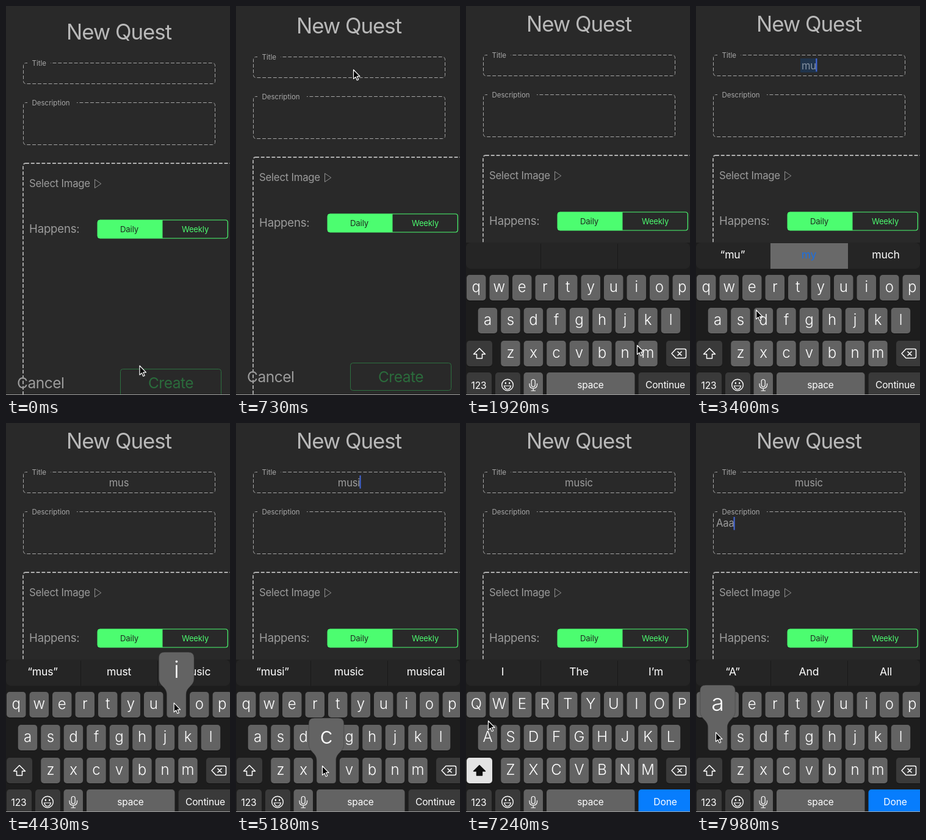
An HTML page that plays this animation: 367x638 px, repeating every 8000 ms.

```html
<!DOCTYPE html>
<html lang="en">
<head>
<meta charset="utf-8">
<title>New Quest</title>
<style>
  html, body { margin: 0; width: 100%; height: 100%; overflow: hidden; background: #292929; }
  svg { display: block; width: 367px; height: 638px; font-family: Inter, Roboto, sans-serif; }
  text { white-space: pre; letter-spacing: -.01em; }
</style>
</head>
<body>
<svg id="stage" viewBox="0 0 367 638"></svg>
<script>
const LOOP = 8000, STEP = 147.75;
const BG = '#292929', GREEN = '#4cfd70', KEY = '#636363', DARK = '#3a3a3a', GREY = '#9c9c9c';

// pointer tip: [step, x, y]
const PATH = [
  [0, 218.5, 589.5], [1, 217, 560], [3, 204, 300], [5, 192, 104], [6, 190, 84], [8, 190, 85],
  [9, 200, 354], [10, 226, 470], [11, 258, 535], [13, 280, 556], [15, 295, 561], [17, 295, 561],
  [20, 243, 458], [21, 241, 458], [23, 98, 498], [24, 74, 508], [26, 72, 509],
  [29, 272, 460], [32, 280, 456], [34, 158, 548], [35, 141, 562], [37, 141, 562],
  [39, 100, 290], [40, 85, 182], [41, 82, 165.5], [46, 82, 165.5], [49, 36, 488], [50, 32, 507], [54, 32, 507]
];
// typed text and suggestions: [step, text, suggestions]
const TYPED = [
  [0, '', []],
  [17, 'm', ['“m”', 'my', 'me']],
  [22, 'mu', ['“mu”', 'my', 'much']],
  [26, 'mus', ['“mus”', 'must', 'music']],
  [32, 'musi', ['“musi”', 'music', 'musical']],
  [36, 'music', ['“music”', 'musical', 'musicians']],
  [44, '', ['I', 'The', 'I’m']],
  [52, 'A', ['“A”', 'And', 'All']],
  [53, 'Aa', ['“A”', 'And', 'All']],
  [54, 'Aaa', ['“A”', 'And', 'All']]
];
const PRESSES = [[15, 16, 'm'], [20, 21, 'u'], [25, 25, 's'], [30, 31, 'i'], [35, 35, 'c'], [51, 54, 'a']];
const BLINKS = [[12, 14], [19, 19], [29, 30], [41, 42], [48, 50]];
const FOCUS_DESC = 44, CAPS_END = 52;

const stage = document.getElementById('stage');

function add(parent, tag, attrs = {}) {
  const el = document.createElementNS('http://www.w3.org/2000/svg', tag);
  set(el, attrs);
  parent.append(el);
  return el;
}
function set(el, attrs) {
  for (const name in attrs) el.setAttribute(name, attrs[name]);
}
function label(parent, str, x, y, size, fill, attrs = {}) {
  const el = add(parent, 'text', { x, y, fill, 'font-size': size, ...attrs });
  el.textContent = str;
  return el;
}
const MID = { 'text-anchor': 'middle' };
const rect = (parent, x, y, width, height, fill, rx = 0) =>
  add(parent, 'rect', { x, y, width, height, fill, rx });
const line = (parent, d, stroke, width, extra = {}) =>
  add(parent, 'path', { d, stroke, 'stroke-width': width, fill: 'none', ...extra });
const show = (el, on) => set(el, { visibility: on ? 'visible' : 'hidden' });

// ---- form ----
const form = add(stage, 'g');

function dashed(x, y, w, h, stroke, width) {
  set(rect(form, x, y, w, h, 'none', 4), { stroke, 'stroke-width': width, 'stroke-dasharray': '5.9 2.9' });
}
function field(name, gapEnd, y, h) {
  dashed(28.5, y, 314, h, '#a6a6a6', 1);
  rect(form, 35, y - 4, gapEnd - 35, 8, BG);
  label(form, name, 42.5, y + 4, 11.5, '#a8a8a8', { style: 'letter-spacing:0' });
}

label(form, 'New Quest', 185, 55, 34.8, '#b9b9b9', { ...MID, style: 'letter-spacing:-.03em' });
field('Title', 73, 93.5, 34);
field('Description', 116, 158.5, 69);
dashed(28, 258, 380, 400, '#b0b0b0', 1.8);
label(form, 'Select Image', 38, 297, 16.8, GREY, { style: 'letter-spacing:-.015em' });
line(form, 'M145.500 284.500V298.500L155.800 291.500Z', GREY, .9);
label(form, 'Happens:', 38, 372, 18.6, GREY);

line(form, 'M256 351H154Q150 351 150 355V377Q150 381 154 381H256Z', GREEN, 1, { fill: GREEN });
line(form, 'M256 351H359.300Q363.300 351 363.300 355V377Q363.300 381 359.300 381H256', GREEN, 1.2);
label(form, 'Daily', 202, 370.8, 13.2, '#1f2a21', MID);
label(form, 'Weekly', 310, 370.8, 13, GREEN, MID);

label(form, 'Cancel', 18, 627, 24.5, GREY, { style: 'letter-spacing:-.02em' });
set(rect(form, 187.5, 595.5, 165, 45, 'none', 4), { stroke: '#2d7040' });
label(form, 'Create', 270, 627, 24.5, '#2b6b3c', { ...MID, style: 'letter-spacing:-.02em' });

const mark = rect(form, 171, 99, 28, 23, '#20344c');
const titleText = label(form, '', 185, 117, 16.6, GREY, MID);
const descText = label(form, '', 33, 182.5, 16.6, GREY);
const caret = rect(form, 184, 99, 2, 21.5, '#4468dc');

// ---- keyboard ----
const board = add(stage, 'g');
rect(board, 0, 388, 367, 300, '#1d1d1d');
rect(board, 0, 388, 367, 43, '#252525', 8);
for (const x of [122, 248]) rect(board, x, 390, 1, 41, '#191919');
const pick = rect(board, 122, 389, 127, 42, '#696969');
const hints = [60, 185, 311].map(x => label(board, '', x, 414.3, 17.6, '#fff', MID));

function key(x, y, w, fill) {
  rect(board, x, y + 1, w, 42, '#111', 5);
  return rect(board, x, y, w, 42, fill, 5);
}
const keys = {};
[['qwertyuiop', 1, 441], ['asdfghjkl', 19.7, 495], ['zxcvbnm', 57.2, 549]].forEach(([row, left, y]) => {
  [...row].forEach((ch, i) => {
    const x = left + i * 37.5;
    key(x, y, 31.5, KEY);
    keys[ch] = { x, y, cap: label(board, ch, x + 15.7, y + 28, 24, '#fff', { ...MID, 'font-weight': 300 }) };
  });
});

const shiftKey = key(1, 549, 42, DARK);
const shiftIcon = line(board, 'M22 561.500L31.500 571H26.500V578H17.500V571H12.500Z', '#fff', 1.5, { 'stroke-linejoin': 'round' });
key(328, 549, 43, DARK);
line(board, 'M344 562.500H358Q360.500 562.500 360.500 565V575Q360.500 577.500 358 577.500H344L337 570Z' +
  'M346.500 566.500L353.500 573.500M353.500 566.500L346.500 573.500', '#fff', 1.5, { 'stroke-linejoin': 'round' });

key(1, 601, 41, DARK);
label(board, '123', 21, 627.5, 15.5, '#fff', MID);
key(48, 601, 41, DARK);
add(board, 'circle', { cx: 68, cy: 621.5, r: 9.3, fill: 'none', stroke: '#fff', 'stroke-width': 1.4 });
for (const cx of [64.8, 71.2]) add(board, 'ellipse', { cx, cy: 618.5, rx: 1.1, ry: 1.7, fill: '#fff' });
line(board, 'M62.500 623H73.500Q72 628.500 68 628.500T62.500 623Z', '#fff', 1.2);
key(94.5, 601, 31.5, KEY);
set(rect(board, 107.2, 612.5, 6, 12, 'none', 3), { stroke: '#fff', 'stroke-width': 1.2 });
line(board, 'M104 619V621Q104 627 110.200 627T116.500 621V619M110.200 627V631M106.500 631H114', '#fff', 1.2);
key(132, 601, 144.5, KEY);
label(board, 'space', 204, 627, 15.4, '#fff', MID);
const goKey = key(282.5, 601, 90, DARK);
const goText = label(board, '', 326.5, 627, 15.6, '#fff', MID);

// ---- key balloon ----
const balloon = add(stage, 'g');
const bubble = add(balloon, 'path', { fill: KEY, stroke: '#3c3c3c', 'stroke-width': .5 });
const bubbleText = label(balloon, '', 0, 0, 38, '#fff', { ...MID, 'font-weight': 300 });

function drawBalloon(ch, caps) {
  const { x, y } = keys[ch], l = x - 13, r = x + 44.5, t = y - 65, e = x + 31.5;
  set(bubble, { d: `M${l + 9} ${t}H${r - 9}Q${r} ${t} ${r} ${t + 9}V${y - 22}` +
    `C${r} ${y - 9} ${e} ${y - 9} ${e} ${y + 5}V${y + 37}Q${e} ${y + 42} ${e - 5} ${y + 42}` +
    `H${x + 5}Q${x} ${y + 42} ${x} ${y + 37}V${y + 5}C${x} ${y - 9} ${l} ${y - 9} ${l} ${y - 22}` +
    `V${t + 9}Q${l} ${t} ${l + 9} ${t}Z` });
  set(bubbleText, { x: x + 15.7, y: y - 23 });
  bubbleText.textContent = caps ? ch.toUpperCase() : ch;
}

// ---- pointer ----
rect(stage, 0, 637, 367, 1, '#a0a0a0');
const pointer = add(stage, 'path', {
  d: 'M.500 .500V15.500L4 12.400L6.300 17.800L8.700 16.800L6.400 11.400H11Z',
  fill: '#000', stroke: '#fff', 'stroke-width': 1.2, 'stroke-linejoin': 'round'
});

function pointerAt(k) {
  const i = Math.max(1, PATH.findIndex(p => p[0] >= k));
  const [k0, x0, y0] = PATH[i - 1], [k1, x1, y1] = PATH[i];
  const f = (k - k0) / (k1 - k0);
  return [x0 + (x1 - x0) * f, y0 + (y1 - y0) * f];
}
const within = (ranges, k) => ranges.find(([a, b]) => k >= a && k <= b);

function draw(k) {
  const inDesc = k >= FOCUS_DESC, caps = inDesc && k < CAPS_END;
  const [, text, words] = TYPED.filter(s => s[0] <= k).pop();
  const marked = text === 'mu';

  set(form, { transform: `translate(0 ${-(k < 4 ? 0 : [4, 10][k - 4] ?? 13)})` });
  set(board, { transform: `translate(0 ${k < 8 ? 260 : [150, 14, 2][k - 8] ?? 0})` });

  titleText.textContent = inDesc ? 'music' : text;
  descText.textContent = inDesc ? text : '';
  set(titleText, { fill: marked ? '#8592a2' : GREY });
  show(mark, marked);
  show(pick, marked);
  hints.forEach((el, i) => { el.textContent = words[i] || ''; });
  set(hints[1], { fill: marked ? '#1c6fe0' : '#fff' });

  const width = (inDesc ? descText : titleText).getComputedTextLength();
  set(caret, inDesc ? { x: 32 + width, y: 167 } : { x: 184.3 + width / 2, y: 99 });
  show(caret, k >= 8 && !within(BLINKS, k));

  for (const ch in keys) keys[ch].cap.textContent = caps ? ch.toUpperCase() : ch;
  set(shiftKey, { fill: caps ? '#e4e4e4' : DARK });
  set(shiftIcon, caps ? { fill: '#111', stroke: '#111' } : { fill: 'none', stroke: '#fff' });
  set(goKey, { fill: inDesc ? '#077dfd' : DARK });
  goText.textContent = inDesc ? 'Done' : 'Continue';

  const press = within(PRESSES, k);
  show(balloon, !!press);
  if (press) drawBalloon(press[2], caps);
  set(pointer, { transform: `translate(${pointerAt(k)})` });
}

let last = -1;
function tick() {
  const t = performance.now() % LOOP;
  const k = Math.min(54, Math.floor((t + 10) / STEP));
  if (k !== last) draw(last = k);
  requestAnimationFrame(tick);
}
tick();
</script>
</body>
</html>
```
